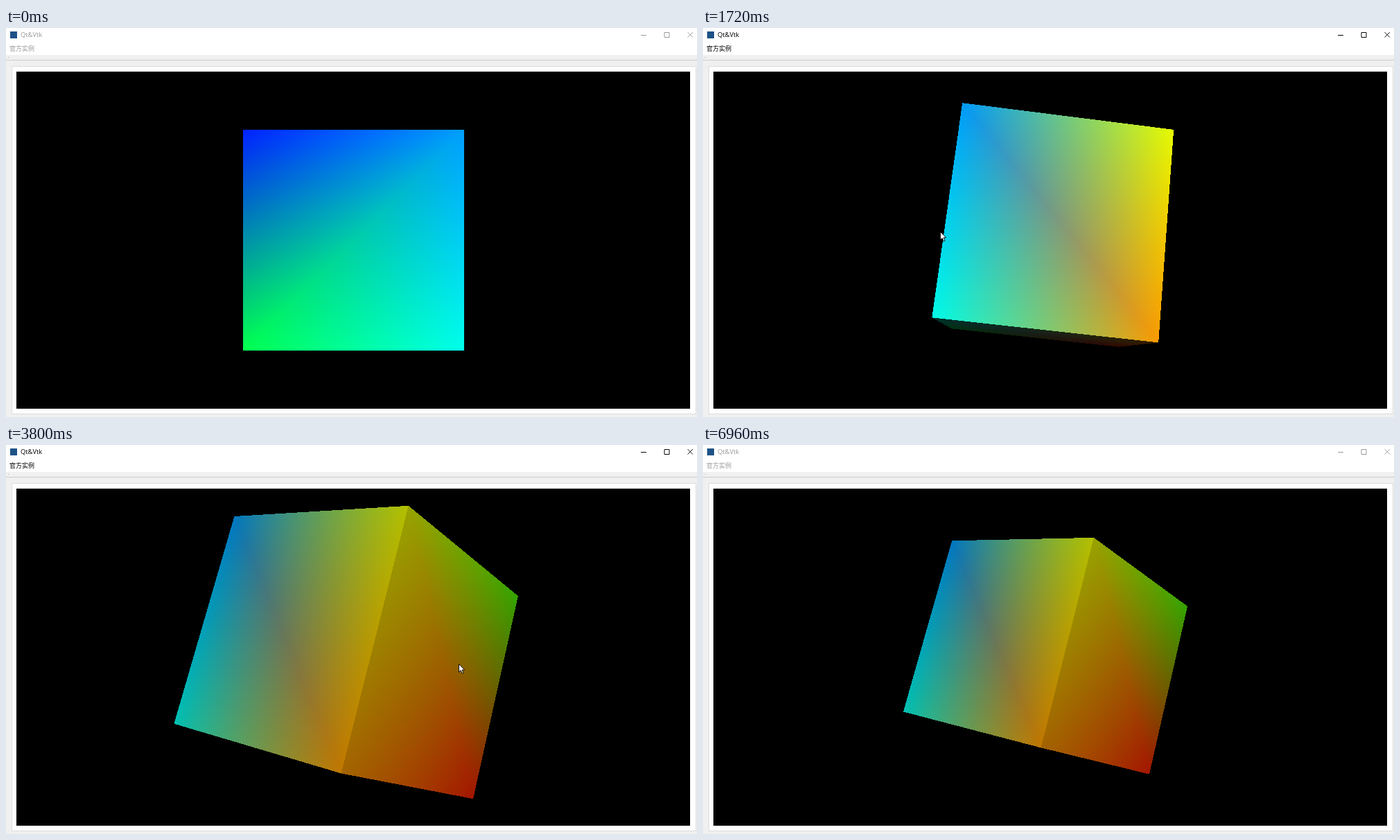
An HTML page with a canvas that plays this animation: 997 px wide and 562 px high, repeating every 7.12 s.

```html
<!DOCTYPE html>
<html lang="zh">
<head>
<meta charset="utf-8">
<title>Qt&amp;Vtk</title>
<style>
html, body { margin: 0; width: 100%; height: 100%; overflow: hidden; }
#stage { position: relative; width: 997px; height: 562px; overflow: hidden; background: #f0f0f0; color: #000; }
#stage.idle { color: #999; }
#stage > * { position: absolute; }
.head { left: 0; top: 0; width: 997px; height: 39px; background: #fff; }
.icon { left: 6px; top: 5px; width: 10px; height: 10px; background: #1d5287; }
.name { left: 21px; top: 3px; font: 9.4px/14px "Open Sans", sans-serif; }
.menu { left: 5px; top: 23px; font: 9px/14px "Noto Sans CJK SC", "Noto Sans CJK", sans-serif; }
.grip { left: 3px; top: 42px; width: 1px; height: 1px; background: #999; }
.rule { left: 0; top: 46px; width: 997px; border-top: 1px dotted #a8a8a8; }
.panel { left: 8px; top: 55px; width: 986px; height: 501px; background: #fff; border: 1px solid #dcdcdc; }
#view { left: 15px; top: 63px; }
svg { left: 0; top: 0; }
</style>
</head>
<body>
<div id="stage" class="idle">
  <div class="head"></div>
  <div class="icon"></div>
  <div class="name">Qt&amp;Vtk</div>
  <div class="menu">官方实例</div>
  <div class="grip"></div>
  <div class="rule"></div>
  <div class="panel"></div>
  <canvas id="view" width="972" height="487"></canvas>
  <svg width="997" height="562">
    <g fill="none" stroke="currentColor">
      <path d="M916 10.5h8M950 6.5h7v7h-7z"/>
      <path d="M983.5 6l7.5 7.5M991 6l-7.5 7.5" stroke-width=".9"/>
    </g>
    <g id="mouse">
      <path d="M0 0V11.6L2.7 9.1L4.6 13.5L6.5 12.7L4.6 8.4H8.1Z" fill="#fff" stroke="#000" stroke-width=".9"/>
      <circle id="press" cx="-.7" cy="-1.2" r="9"/>
    </g>
  </svg>
</div>
<script>
const LOOP = 7120, STEP = 1000 / 15, LAG = 28;
const ACTIVE = 680, INACTIVE = 6960, POINTER_GONE = 6610;
const $ = id => document.getElementById(id);
const stage = $('stage'), mouse = $('mouse'), press = $('press');
const ctx = $('view').getContext('2d');
const { width: W, height: H } = ctx.canvas;
const CX = W / 2 + .2, CY = H / 2;
const FOCAL = CY / Math.tan(Math.PI / 12);
const FIT = Math.sqrt(.75) / Math.sin(Math.PI / 12);
const img = ctx.createImageData(W, H);
const words = new Uint32Array(img.data.buffer);

// Pointer strokes: end time, x, y, button held on the way
const LEFT = 'rgba(225,225,20,.6)', RIGHT = 'rgba(185,20,0,.7)';
const strokes = [
  [40, 540, 541],
  [ACTIVE, 506, 476],
  [1080, 299, 441, LEFT],
  [1238, 484, 295],
  [1320, 484, 295],
  [1640, 267, 290, LEFT],
  [1920, 587, 305],
  [2172, 427, 311, LEFT],
  [2310, 378, 308, LEFT],
  [2560, 610, 318.5],
  [3105, 610, 286, RIGHT],
  [3380, 610, 270, RIGHT],
  [3660, 610, 286, RIGHT],
  [4440, 910, 497],
  [4830, 566, 324],
  [5880, 566, 323],
  [6560, 928, 557]
];
const DEG_PER_PX = 20 * 10 / W;
const ZOOM_PX = CY / 10;

const clamp = (v, lo = 0, hi = 1) => Math.min(hi, Math.max(lo, v));
const mix = (a, b, f) => a + (b - a) * f;

const corners = Array.from({ length: 8 }, (_, i) => {
  const hue = clamp(i / 7 * 4, .12, 3.88);
  return {
    pos: [(i + 1 >> 1) & 1, (i >> 1) & 1, i >> 2].map(v => v - .5),
    rgb: [2 - hue, Math.min(hue, 4 - hue), hue - 2].map(v => 255 * clamp(v * 1.08))
  };
});
const faces = ['0123', '4567', '0154', '1265', '2376', '3047'].map(s => [...s].map(Number));

// Pointer place, and the pixels dragged so far with each button
function pointer(t) {
  let [start, x, y] = strokes[0], turned = 0, pulled = 0, button;
  for (const [end, toX, toY, held] of strokes.slice(1)) {
    if (t < start) break;
    const f = clamp((t - start) / (end - start));
    const dx = (toX - x) * f, dy = (toY - y) * f;
    if (held === LEFT) turned -= dx;
    if (held === RIGHT) pulled -= dy;
    x += dx;
    y += dy;
    button = t < end ? held : undefined;
    start = end;
  }
  return { x, y, turned, pulled, button };
}

// Dragging sinks the camera first, then tilts it while it goes round
function angles(turned) {
  const az = turned * DEG_PER_PX;
  const sink = clamp(az / 42.6), tilt = clamp((az - 42.6) / 87.7);
  return [az, mix(-14.6 * sink, -7.7, tilt), mix(2.3 * sink, -14.3, tilt)];
}

// Three wheel clicks out, two back in
const wheel = step => clamp(step - 76, 0, 3) - clamp(step - 84, 0, 2);

function spin(a, b, deg) {
  const c = Math.cos(deg * Math.PI / 180), s = Math.sin(deg * Math.PI / 180);
  return [a * c - b * s, a * s + b * c];
}

function project({ pos, rgb }, [az, el, roll], dist) {
  let [x, y, z] = pos;
  [x, z] = spin(x, z, az);
  [z, y] = spin(z, y, -el);
  [x, y] = spin(x, y, roll);
  const q = 1 / (dist - z);
  return { x: CX + FOCAL * x * q, y: CY - FOCAL * y * q, z, q, rgb };
}

const edge = (a, b, x, y) => (b.x - a.x) * (y - a.y) - (b.y - a.y) * (x - a.x);

// Perspective-correct colour blend over one triangle
function triangle(a, b, c, light) {
  const area = edge(a, b, c.x, c.y);
  const xs = [a.x, b.x, c.x], ys = [a.y, b.y, c.y];
  const x0 = Math.max(0, Math.floor(Math.min(...xs))), x1 = Math.min(W - 1, Math.ceil(Math.max(...xs)));
  const y0 = Math.max(0, Math.floor(Math.min(...ys))), y1 = Math.min(H - 1, Math.ceil(Math.max(...ys)));
  for (let y = y0; y <= y1; y++) {
    for (let x = x0; x <= x1; x++) {
      const px = x + .5, py = y + .5;
      let u = edge(b, c, px, py) / area, v = edge(c, a, px, py) / area, w = 1 - u - v;
      if (u < 0 || v < 0 || w < -1e-9) continue;
      u *= a.q; v *= b.q; w *= c.q;
      const k = light / (u + v + w), o = (y * W + x) * 4;
      for (let i = 0; i < 3; i++) img.data[o + i] = (u * a.rgb[i] + v * b.rgb[i] + w * c.rgb[i]) * k;
    }
  }
}

function drawCube(turn, dist) {
  words.fill(0xff000000);
  const pts = corners.map(c => project(c, turn, dist));
  for (const face of faces) {
    const [a, b, c, d] = face.map(i => pts[i]);
    const facing = (a.z + b.z + c.z + d.z) / 2;
    if (facing * dist <= .5) continue;
    triangle(a, b, c, facing);
    triangle(a, c, d, facing);
  }
  ctx.putImageData(img, 0, 0);
}

function draw(step) {
  const t = step * STEP - LAG;
  const { x, y, turned, pulled, button } = pointer(t);
  drawCube(angles(turned), FIT * 1.1 ** (2 * wheel(step) - pulled / ZOOM_PX));
  mouse.setAttribute('transform', `translate(${Math.round(x) + .5} ${Math.round(y) + .5})`);
  mouse.style.display = t > 0 && t < POINTER_GONE ? '' : 'none';
  press.setAttribute('fill', button || 'none');
}

let last = -1;
function frame() {
  const now = performance.now() % LOOP;
  const step = Math.floor((now + LAG) / STEP);
  if (step !== last) draw(last = step);
  stage.classList.toggle('idle', now < ACTIVE || now >= INACTIVE);
  requestAnimationFrame(frame);
}
frame();
</script>
</body>
</html>
```
